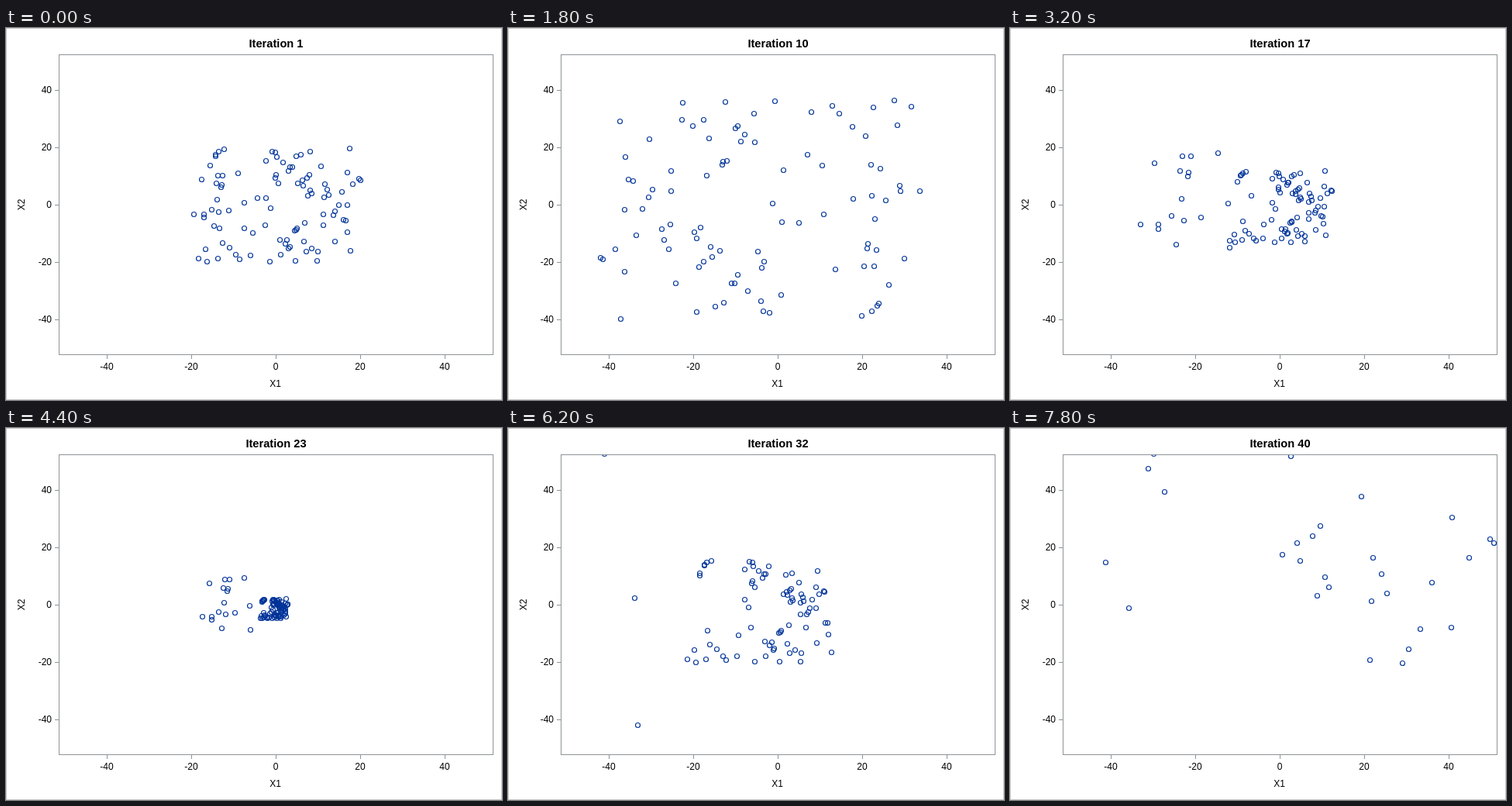
Recreate the animation shown at these times as an HTML page. Size 640 by 480 pixels, loop 8 s.

```html
<!DOCTYPE html>
<html lang="en">
<head>
<meta charset="utf-8">
<title>Swarm iterations</title>
<style>
html, body { margin: 0; width: 100%; height: 100%; overflow: hidden; background: #fff; }
svg { display: block; width: 640px; height: 480px; }
text { font: 12px "Liberation Sans", Arial, sans-serif; text-anchor: middle; }
#title { font-size: 14.67px; font-weight: bold; }
.tick { stroke: #8f9498; }
#dots circle { fill: none; stroke: #039; stroke-width: 1.15; }
</style>
</head>
<body>
<svg viewBox="0 0 640 480">
  <defs><clipPath id="plot"><rect x="69" y="35" width="559" height="386"/></clipPath></defs>
  <rect x=".5" y=".5" width="639" height="479" fill="#fff" stroke="#c8c8c8"/>
  <text id="title" x="348.5" y="25"></text>
  <g id="axes"></g>
  <text x="347.5" y="463">X1</text>
  <text transform="translate(24 228) rotate(-90)">X2</text>
  <g id="dots" clip-path="url(#plot)"></g>
  <rect x="68.5" y="34.5" width="560" height="387" fill="none" stroke="#8f9498"/>
</svg>
<script>
const STEP = 200, COUNT = 40, SWARM = 98, RANGE = 20;
const toX = x => Math.round(348 + x * 5.45);
const toY = y => Math.round(228 - y * 3.71);
const $ = id => document.getElementById(id);

// The swarm swings about its centre. Key: iteration, scale, shift x, shift y.
const spread = [[1, 1, 0, 0], [6, -4.05, -11.2, 0.8], [10, -1.92, -3.75, -1.5], [14, 2.3, 0, 0]];
const settle = [...spread, [17, 0.63, -0.3, -0.55], [20, -0.45, -0.5, -0.8], [23, 0.17, -0.6, -1.3], [28, -1.6, -3, 0]];
const paths = {
  low: [...settle, [32, 0.95, -4, -1.2], [40, 5, 0, -40]],
  left: [...settle, [32, 0.8, -6, 0], [40, 4.6, -30, 4]],
  right: [...settle, [32, 0.65, -2, -1], [40, 3.4, -17, -8]],
  stray: [...spread, [17, 1.75, 1, -1], [20, -1.5, 0, 0], [23, 0.95, 0.95, -1], [28, -3, 0, 0], [32, 5, 4, -2], [40, -14, 0, 0]]
};

// Where a particle starts decides which path it follows.
function pathOf(x, y) {
  if (x < -4 && y > -8 && y < 11) return "stray";
  if (y < -5) return "low";
  return x < 5 ? "left" : "right";
}

function poseAt(keys, n) {
  const i = Math.max(1, keys.findIndex(key => key[0] >= n));
  const a = keys[i - 1], b = keys[i];
  const ease = (1 - Math.cos(Math.PI * (n - a[0]) / (b[0] - a[0]))) / 2;
  return a.slice(1).map((v, j) => v + (b[j + 1] - v) * ease);
}

function seeded(seed) {
  return () => (seed = (seed * 16807) % 2147483647) / 2147483647;
}

function add(parent, name, attrs, text = "") {
  const el = document.createElementNS("http://www.w3.org/2000/svg", name);
  for (const key in attrs) el.setAttribute(key, attrs[key]);
  el.textContent = text;
  return parent.appendChild(el);
}

for (let v = -40; v <= 40; v += 20) {
  const x = toX(v), y = toY(v);
  add($("axes"), "path", { class: "tick", d: `M${x + 0.5} 422v5M63 ${y + 0.5}h5` });
  add($("axes"), "text", { x, y: 441 }, v);
  add($("axes"), "text", { x: 59, y: y + 4, style: "text-anchor:end" }, v);
}

const random = seeded(20177);
const place = () => (random() * 2 - 1) * RANGE;
const swarm = Array.from({ length: SWARM }, () => {
  const x = place(), y = place();
  return { x, y, path: pathOf(x, y), el: add($("dots"), "circle", { r: 3 }) };
});

function draw(n) {
  $("title").textContent = `Iteration ${n}`;
  for (const { x, y, path, el } of swarm) {
    const [scale, dx, dy] = poseAt(paths[path], n);
    el.setAttribute("cx", toX(scale * x + dx) + 0.5);
    el.setAttribute("cy", toY(scale * y + dy) + 0.5);
  }
}

const begin = performance.now();
let shown = 0;
function tick() {
  const n = Math.floor((performance.now() - begin) / STEP) % COUNT + 1;
  if (n !== shown) draw(shown = n);
  requestAnimationFrame(tick);
}
tick();
</script>
</body>
</html>
```
